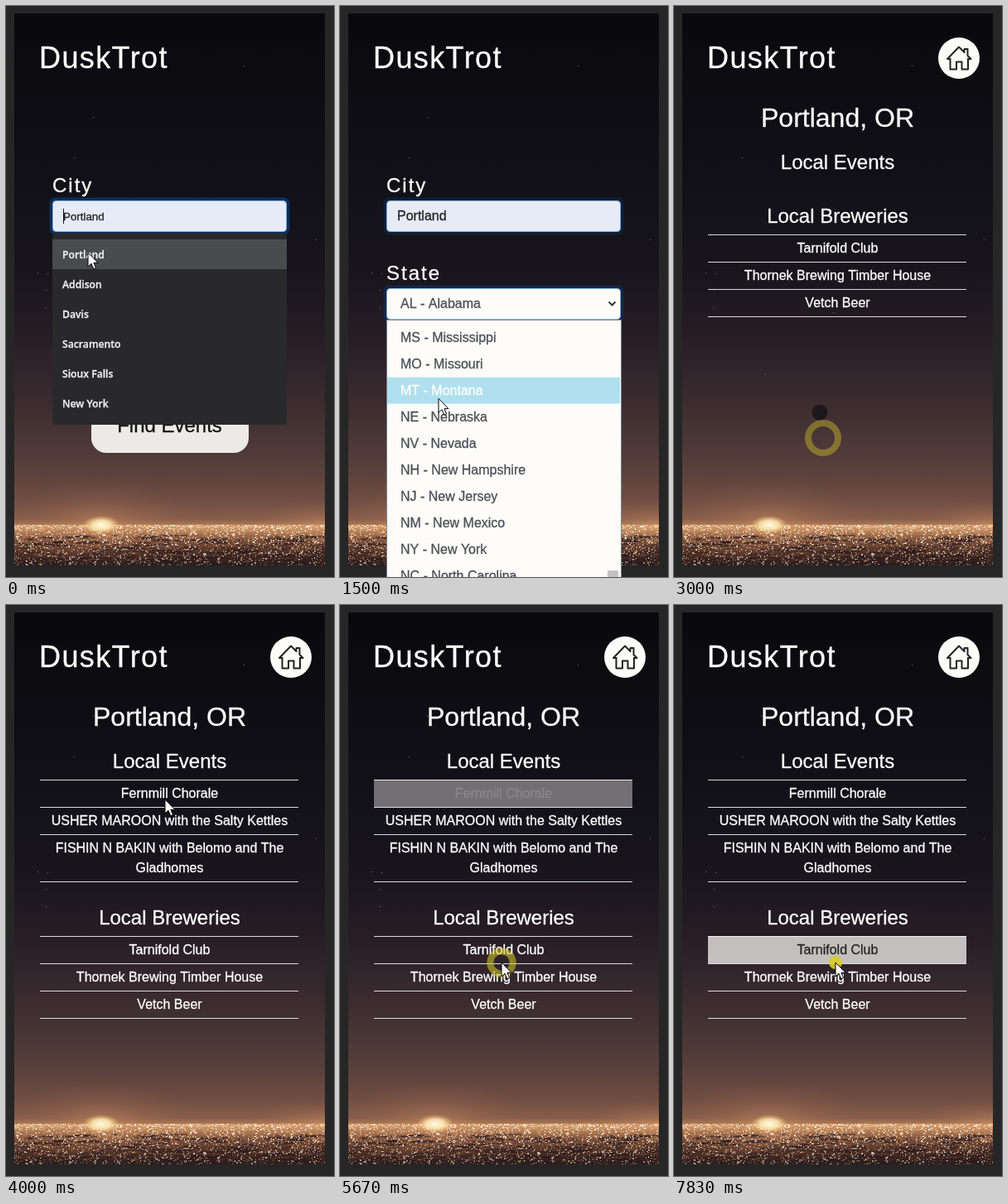
An HTML page with a canvas for the animation above (8000 ms loop, 396 by 690 pixels).

```html
<!DOCTYPE html>
<html lang="en">
<head>
<meta charset="utf-8">
<title>DuskTrot</title>
<style>
html, body { margin: 0; width: 100%; height: 100%; overflow: hidden; background: #262626; }
canvas { display: block; }
</style>
</head>
<body>
<canvas id="stage" width="396" height="690"></canvas>
<script>
const W = 396, H = 690, LOOP = 8000, STEP = 1000 / 6, MID = 197.5;
const ctx = document.getElementById('stage').getContext('2d');
const SANS = '"Liberation Sans", Arial, sans-serif';
const PAPER = '#fdfcf8';

const cities = ['Portland', 'Addison', 'Davis', 'Sacramento', 'Sioux Falls', 'New York'];
const states = ('AL-Alabama,AK-Alaska,AS-American Samoa,AZ-Arizona,AR-Arkansas,CA-California,CO-Colorado,' +
  'CT-Connecticut,DE-Delaware,DC-District Of Columbia,FM-Federated States Of Micronesia,FL-Florida,GA-Georgia,' +
  'GU-Guam,HI-Hawaii,ID-Idaho,IL-Illinois,IN-Indiana,IA-Iowa,KS-Kansas,KY-Kentucky,LA-Louisiana,ME-Maine,' +
  'MH-Marshall Islands,MD-Maryland,MA-Massachusetts,MI-Michigan,MN-Minnesota,MS-Mississippi,MO-Missouri,' +
  'MT-Montana,NE-Nebraska,NV-Nevada,NH-New Hampshire,NJ-New Jersey,NM-New Mexico,NY-New York,' +
  'NC-North Carolina,ND-North Dakota,MP-Northern Mariana Islands,OH-Ohio,OK-Oklahoma,OR-Oregon,PW-Palau,' +
  'PA-Pennsylvania,PR-Puerto Rico,RI-Rhode Island,SC-South Carolina,SD-South Dakota,TN-Tennessee,TX-Texas,' +
  'UT-Utah,VT-Vermont,VI-Virgin Islands,VA-Virginia,WA-Washington,WV-West Virginia,WI-Wisconsin,WY-Wyoming')
  .split(',').map(s => s.replace('-', ' - '));
const events = [['Fernmill Chorale'], ['USHER MAROON with the Salty Kettles'],
  ['FISHIN N BAKIN with Belomo and The', 'Gladhomes']];
const breweries = [['Tarnifold Club'], ['Thornek Brewing Timber House'], ['Vetch Beer']];

// Scene times in ms
const T = { picked: 320, listOpen: 750, listShut: 2100, results: 2660, events: 3330,
  open1: 4250, close1: 5320, open2: 6300, close2: 7830 };

// [time, x, y]
const path = [[0, 99, 298], [333, 99, 298], [833, 117, 380], [1200, 119, 440], [1700, 119, 493],
  [2300, 119, 493], [2500, 176, 491], [2667, 177, 500], [3000, 180, 522], [3400, 190, 470],
  [4000, 192, 235], [4667, 192, 235], [5170, 195, 432], [LOOP, 195, 432]];
const clicks = [[260, 99, 300], [760, 117, 372], [2500], [4170], [T.close1], [6200], [T.close2]];

const clamp = v => Math.max(0, Math.min(1, v));
const ease = v => { v = clamp(v); return v * v * (3 - 2 * v); };

function cursorAt(t) {
  const i = path.findIndex(p => p[0] > t), a = path[i - 1], b = path[i];
  const k = ease((t - a[0]) / (b[0] - a[0]));
  return [a[1] + (b[1] - a[1]) * k, a[2] + (b[2] - a[2]) * k];
}

// A hairline outline gives the slightly heavy look of screen type
function text(s, x, y, size, color = '#fff', { align = 'left', spacing = 0, font = SANS, weight = 400 } = {}) {
  ctx.font = `${weight} ${size}px ${font}`;
  ctx.textAlign = align;
  ctx.letterSpacing = spacing + 'px';
  ctx.fillStyle = ctx.strokeStyle = color;
  ctx.lineWidth = .3;
  ctx.fillText(s, x, y);
  ctx.strokeText(s, x, y);
}
const centered = (s, y, size, color) => text(s, MID, y, size, color, { align: 'center' });

function rect(x, y, w, h, color, c = ctx) {
  c.fillStyle = color;
  c.fillRect(x, y, w, h);
}
function box(x, y, w, h, r, fill, stroke, lineWidth = 1) {
  ctx.beginPath();
  ctx.roundRect(x, y, w, h, r);
  if (fill) { ctx.fillStyle = fill; ctx.fill(); }
  if (stroke) { ctx.strokeStyle = stroke; ctx.lineWidth = lineWidth; ctx.stroke(); }
}
function disc(x, y, r, color) {
  ctx.beginPath();
  ctx.arc(x, y, r, 0, 7);
  ctx.fillStyle = color;
  ctx.fill();
}
function line(points, color, width) {
  ctx.beginPath();
  points.forEach(p => ctx.lineTo(...p));
  ctx.strokeStyle = color;
  ctx.lineWidth = width;
  ctx.stroke();
}

const backdrop = makeBackdrop();
function makeBackdrop() {
  const cv = document.createElement('canvas');
  cv.width = W; cv.height = H;
  const c = cv.getContext('2d');
  rect(0, 0, W, H, '#262626', c);
  c.beginPath();
  c.rect(10, 9, 375, 667);
  c.clip();
  const sky = c.createLinearGradient(0, 9, 0, 676);
  [[9, '#09090d'], [200, '#111017'], [320, '#18151d'], [400, '#271d25'], [480, '#3b2c30'], [530, '#4c3837'],
    [570, '#5e433d'], [600, '#714f44'], [620, '#875e4b'], [626, '#a87552'], [629, '#d9a574'], [636, '#b07a52'],
    [645, '#7d523d'], [658, '#573629'], [676, '#2e1d1c']]
    .forEach(([y, col]) => sky.addColorStop((y - 9) / 667, col));
  rect(0, 0, W, H, sky, c);

  [[105, 134], [82, 183], [287, 72], [38, 322], [50, 323], [48, 343], [48, 364], [110, 445], [374, 282], [192, 370]]
    .forEach(([x, y]) => rect(x, y, 1, 1, '#77737a', c));

  const glow = (x, rx, ry, stops) => {
    c.save();
    c.translate(x, 627);
    c.scale(rx, ry);
    const g = c.createRadialGradient(0, 0, 0, 0, 0, 1);
    stops.forEach((s, i) => g.addColorStop(i / (stops.length - 1), s));
    rect(-1, -1, 2, 2, g, c);
    c.restore();
  };
  glow(115, 120, 55, ['rgba(215,150,100,.5)', 'rgba(180,120,85,.2)', 'rgba(150,95,70,0)']);
  glow(385, 100, 32, ['rgba(225,160,110,.4)', 'rgba(150,95,70,0)']);

  // Lights lie along streets, denser and brighter towards the horizon
  let seed = 7;
  const rnd = () => (seed = seed * 16807 % 2147483647) / 2147483647;
  const pick = list => list[Math.floor(rnd() * list.length)];
  for (let i = 0; i < 260; i++) {
    c.globalAlpha = .5;
    rect(10 + 375 * rnd(), 639 + 37 * rnd(), 6 + 22 * rnd(), 2, '#2a1a1e', c);
  }
  const lights = ['#ffffff', '#fff3dd', '#ffe2b4', '#f3bd80', '#c98850', '#e6d3cb'];
  for (let i = 0; i < 3000; i++) {
    const y = 627 + 49 * rnd() ** 1.7, near = 1 - (y - 627) / 60;
    c.globalAlpha = (.4 + .6 * rnd()) * (.5 + .5 * near);
    rect(10 + Math.floor(375 * rnd()), Math.floor(y), rnd() < .4 ? 2 : 1, rnd() < .25 ? 2 : 1, pick(lights), c);
  }
  c.globalAlpha = 1;
  glow(115, 22, 11, ['#fffbe6', 'rgba(255,236,180,.85)', 'rgba(255,205,130,0)']);
  return cv;
}

function field(y, fill, ring, focus) {
  if (focus) box(54.5, y - 1.5, 286, 41, 5, null, `rgba(8,62,125,${focus})`, 4);
  box(56.5, y + .5, 282, 37, 4, fill, ring);
}

function drawForm(t) {
  const picked = t >= T.picked, chosen = t >= T.listShut;
  text('City', 56, 225, 24, '#fff', { spacing: 2 });
  field(235, '#e7ebf7', chosen ? '#c8cdd8' : '#86b4e6', chosen ? 0 : picked ? .3 : .65);
  text('Portland', 69, 259, picked ? 16 : 13.33, '#222');
  if (!picked) rect(69, 245, 1, 18, '#111');

  text('State', 56, 331, 24, '#fff', { spacing: 2 });
  field(341, PAPER, '#86b4e6', t > T.listOpen ? (chosen ? .8 : .4) : 0);
  text(states[chosen ? 42 : 0], 73, 365, 16, '#495057');
  line([[324.5, 357.5], [328.5, 361.5], [332.5, 357.5]], '#343a40', 2);

  box(103, 475, 190, 65, 18, '#ebeae6');
  centered('Find Events', 515, 24, '#111');

  if (!picked) drawSuggestions();
  if (t >= T.listOpen && !chosen) drawStates(t);
}

function drawSuggestions() {
  box(56, 275, 283, 231, 4, '#29292b');
  rect(56, 282, 283, 36, '#4a4b4d');
  cities.forEach((name, i) =>
    text(name, 68, 305 + 36 * i, 12.2, '#f1f1f1', { font: '"Open Sans", "Noto Sans", sans-serif', weight: 600 }));
}

function drawStates(t) {
  const top = 380, row = 32, view = 640, total = states.length * row;
  const scroll = (total - view) * ease((t - 950) / 850);
  const hot = Math.floor((Math.max(cursorAt(t)[1], top) - top + scroll) / row);
  ctx.save();
  ctx.beginPath();
  ctx.rect(56, top - 1, 284, H);
  ctx.clip();
  rect(56, top - 1, 284, H, '#7d8793');
  rect(57, top, 282, H, PAPER);
  states.forEach((name, i) => {
    const y = top + i * row - scroll;
    if (y < top - row || y > H) return;
    if (i === hot) rect(57, y, 281, row, '#b0e0ee');
    text(name, 73, y + 21, 16, i === hot ? '#fff' : '#495057');
  });
  ctx.globalCompositeOperation = 'multiply';
  rect(323, top + scroll * view / total, 13, view * view / total, '#c5c4c7');
  ctx.restore();
}

function drawHome() {
  disc(344, 63, 25, PAPER);
  ctx.lineJoin = 'round';
  line([[333.5, 63], [333.5, 76.5], [341, 76.5], [341, 67.5], [347.5, 67.5], [347.5, 76.5], [355, 76.5], [355, 63]], '#222', 2);
  line([[333.5, 64], [330, 64], [344, 49.5], [350.5, 56], [350.5, 52], [354.5, 52], [354.5, 60], [358.5, 64], [355, 64]], '#222', 2);
}

function drawRows(rows, y, glow) {
  rect(41, y, 312, 1, '#dcdcdc');
  rows.forEach((lines, i) => {
    const h = 9 + 24 * lines.length, lit = i === 0 ? glow : 0;
    if (lit) rect(41, y, 312, h, `rgba(250,248,244,${lit})`);
    const v = Math.round(255 * clamp(1 - 1.15 * lit));
    lines.forEach((s, n) => centered(s, y + 22 + 24 * n, 16, `rgb(${v},${v},${v})`));
    y += h;
    rect(41, y, 312, 1, '#dcdcdc');
  });
}

function drawResults(t) {
  const loaded = t >= T.events, shift = loaded ? 124 : 0;
  const glow = (open, close) => t < open ? 0 : t < close ? 1 : Math.max(0, .74 - (t - close) / 1050);
  drawHome();
  centered('Portland, OR', 146, 32);
  centered('Local Events', 197, 24);
  if (loaded) drawRows(events, 211, glow(T.open1, T.close1));
  centered('Local Breweries', 262 + shift, 24);
  drawRows(breweries, 276 + shift, glow(T.open2, T.close2));
  if (t < 3150) disc(176, 491, 9.5, '#1c171b');
  if (t >= T.open1 && t < T.close1) drawModal(events[0][0], ['Where: Tilvon Auditorium', 'When: 2020-08-11', 'Learn More']);
  if (t >= T.open2 && t < T.close2) drawModal(breweries[0][0], ['Where: Portland, OR', 'Learn More']);
}

function drawModal(title, lines) {
  rect(10, 9, 375, 667, 'rgba(163,163,163,.72)');
  rect(41, 176, 313, 333, PAPER);
  centered(title, 262, 24, '#111');
  lines.forEach((s, i) => centered(s, 309 + 24 * i, 16, s === 'Learn More' ? '#1b80e4' : '#212529'));
  box(158, 396, 80, 65, 17, '#2f343a');
  centered('Close', 434, 16, '#fff');
}

function drawPointer(t) {
  const [x, y] = cursorAt(t);
  if (t >= 2000 && t < 2400) {
    disc(x, y, 14, '#e3cf45');
    disc(x, y, 10.5, '#858176');
  }
  for (const [start, cx = x, cy = y] of clicks) {
    const k = (t - start) / 500;
    if (k < 0 || k > 1.1) continue;
    ctx.beginPath();
    ctx.arc(cx, cy, 4 + 14 * k, 0, 7);
    ctx.strokeStyle = `rgba(218,204,40,${.9 - .5 * k})`;
    ctx.lineWidth = 8;
    ctx.stroke();
  }
  if (t >= 2000 && t < 3300) return;
  ctx.beginPath();
  [[0, 0], [0, 17], [4, 13.3], [6.8, 19.8], [9.6, 18.6], [6.9, 12.3], [12, 12.3]]
    .forEach(([dx, dy]) => ctx.lineTo(x + dx, y + dy));
  ctx.closePath();
  ctx.fillStyle = '#fff';
  ctx.fill();
  ctx.strokeStyle = '#000';
  ctx.lineWidth = 1;
  ctx.stroke();
}

function frame(now) {
  const t = Math.floor((now % LOOP + 4) / STEP) * STEP % LOOP;
  ctx.drawImage(backdrop, 0, 0);
  text('DuskTrot', 40, 75, 36, '#fff', { spacing: 1.4 });
  (t < T.results ? drawForm : drawResults)(t);
  drawPointer(t);
  requestAnimationFrame(frame);
}
requestAnimationFrame(frame);
</script>
</body>
</html>
```
